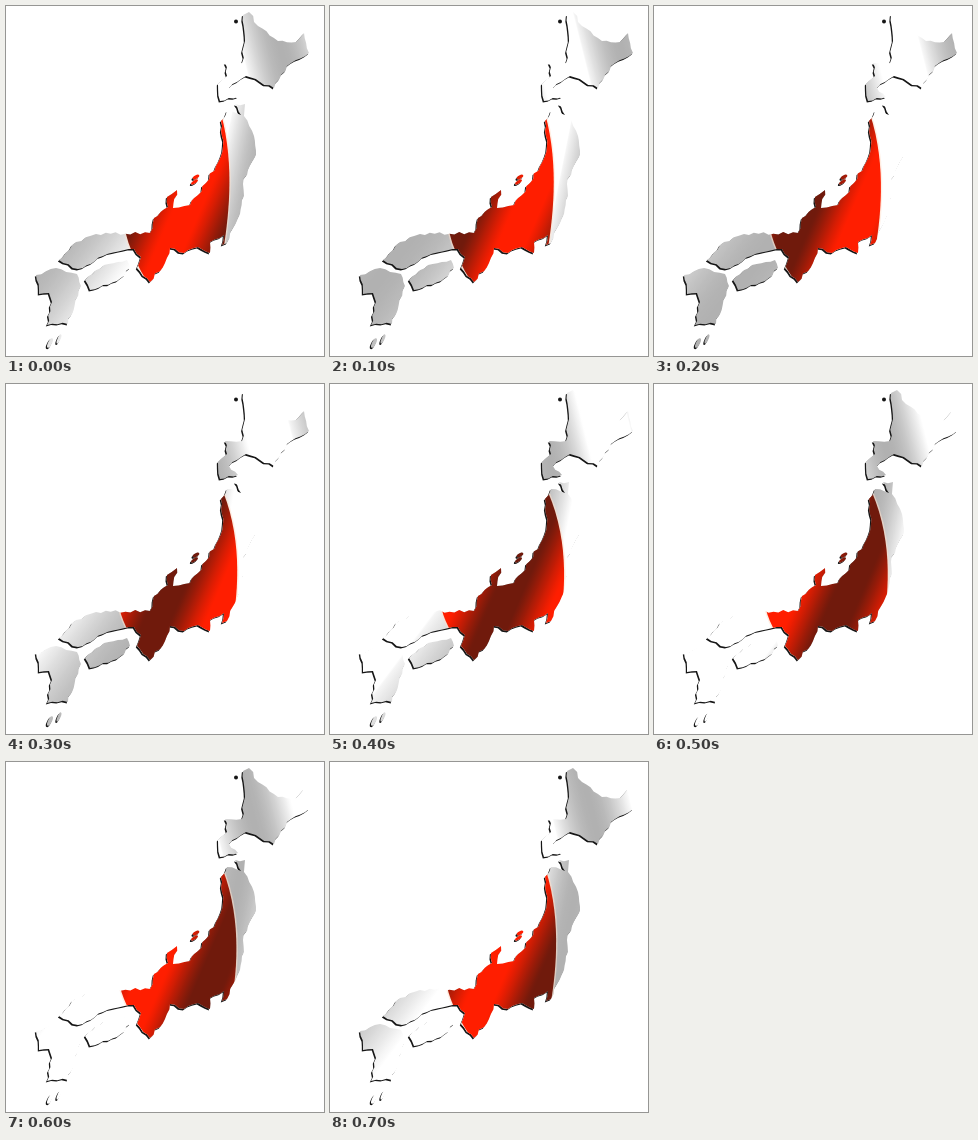
Recreate the animation shown at these times as an HTML page with a canvas. Size 318 by 350 pixels, loop 0.8 s.

```html
<!DOCTYPE html>
<html lang="en">
<head>
<meta charset="utf-8">
<title>Waving map</title>
<style>
html, body { margin: 0; width: 100%; height: 100%; overflow: hidden; background: #fff; }
canvas { display: block; }
</style>
</head>
<body>
<canvas id="stage" width="318" height="350"></canvas>
<script>
const ctx = document.getElementById('stage').getContext('2d');
const STEPS = 8, STEP_MS = 100, TAU = 2 * Math.PI;
const clamp = v => Math.max(0, Math.min(1, v));

// corner points of each island; the coast between them is roughened
const north = '237,9 243,6 252,20 272,35 290,36 298,27 303,47 281,60 268,82 240,70 223,82 232,91 214,95 212,78 221,70 219,57 236,57 239,35';
const main = '215,115 221,105 235,109 229,98 239,98 238,110 248,130 250,149 242,164 237,178 238,190 234,208 221,237 216,239 218,229 204,236 204,247 192,241 178,247 164,242 159,257 144,276 131,262 135,251 128,243 97,250 72,263 53,254 70,236 90,228 144,227 148,212 162,201 161,191 171,184 167,202 184,199 192,189 210,160 217,140';
const west = '30,269 50,262 71,268 75,280 62,318 41,319 46,296 43,287 33,288';
const south = '79,274 98,259 121,254 124,262 111,275 84,284';

let seed = 7;
const random = () => (seed = seed * 16807 % 2147483647) / 2147483647;

const map = new Path2D();

function addIsland(text) {
  const points = text.split(' ').map(p => p.split(',').map(Number));
  const coast = new Path2D();
  points.forEach(([x, y], i) => {
    const [nx, ny] = points[(i + 1) % points.length];
    const dx = nx - x, dy = ny - y, size = Math.hypot(dx, dy);
    const parts = Math.max(1, Math.round(size / 5));
    for (let j = 0; j < parts; j++) {
      const bump = j ? (random() - .5) * 2.8 / size : 0;
      coast.lineTo(x + dx * j / parts - dy * bump, y + dy * j / parts + dx * bump);
    }
  });
  coast.closePath();
  map.addPath(coast);
}

function addIslet(x, y, rx, ry, turn) {
  const islet = new Path2D();
  islet.ellipse(x, y, rx, ry, turn, 0, TAU);
  map.addPath(islet);
}

[north, main, west, south].forEach(addIsland);
addIslet(190, 171, 3.6, 1.7, -.5);
addIslet(188.5, 176, 4, 1.5, -.6);
addIslet(44, 337, 2, 5.2, .45);
addIslet(53, 333, 1.5, 5, .4);

function grey(phase) {
  const q = phase - Math.floor(phase);
  const depth = Math.sin(TAU / 4 * clamp(1 - Math.abs(q - .69) / .33));
  const v = Math.round(255 - 78 * depth);
  return `rgb(${v},${v},${v})`;
}

function red(phase) {
  const d = clamp(.5 + .65 * Math.cos(TAU * phase));
  return `rgb(${255 - 143 * d},${30 - 4 * d},${12 * d})`;
}

// Slanted wave running along u = x + slope * y; phase 0 sits at `origin`
function wave(slope, from, to, origin, length, color) {
  const d = (to - from) / (1 + slope * slope);
  const g = ctx.createLinearGradient(from, 0, from + d, d * slope);
  for (let i = 0; i <= 80; i++) {
    const u = from + (to - from) * i / 80;
    g.addColorStop(i / 80, color((origin - u) / length));
  }
  return g;
}

function fillRect(style, x, y, w, h) {
  ctx.fillStyle = style;
  ctx.fillRect(x, y, w, h);
}

function draw(k) {
  fillRect('#fff', 0, 0, 318, 350);

  // dark lower-left rim
  ctx.save();
  ctx.translate(-1.2, 1.4);
  ctx.fillStyle = '#161616';
  ctx.fill(map);
  ctx.restore();
  ctx.beginPath();
  ctx.arc(230, 15.5, 2, 0, TAU);
  ctx.fillStyle = '#161616';
  ctx.fill();

  ctx.save();
  ctx.clip(map);
  fillRect(wave(-.25, 190, 310, 225 + 16 * k, 128, grey), 200, 0, 118, 97);
  fillRect(wave(.2, 220, 310, 248 + 16 * k, 128, grey), 180, 97, 138, 153);
  fillRect(wave(.75, 200, 400, 115 + 40 * k, 320, grey), 0, 150, 180, 200);

  // red disc swells and shrinks with the wave
  const s = 6 + 6 * Math.cos(TAU * (k - 4.4) / STEPS);
  const left = 119 - s * .65;
  ctx.beginPath();
  ctx.moveTo(left, 224);
  ctx.quadraticCurveTo(left + 6, 250, 143 + s * .2, 279);
  ctx.lineTo(216 + s, 250);
  ctx.bezierCurveTo(222 + s * 1.1, 215, 229 + s, 160, 215 + s * .25, 108);
  ctx.lineTo(140, 150);
  ctx.closePath();
  ctx.strokeStyle = 'rgba(255,225,205,.55)';
  ctx.lineWidth = 3;
  ctx.stroke();
  ctx.fillStyle = wave(.43, 200, 360, 206 + 15.6 * k, 125, red);
  ctx.fill();
  ctx.restore();
}

function tick(now) {
  draw(Math.floor(now / STEP_MS) % STEPS);
  requestAnimationFrame(tick);
}
draw(0);
requestAnimationFrame(tick);
</script>
</body>
</html>
```
